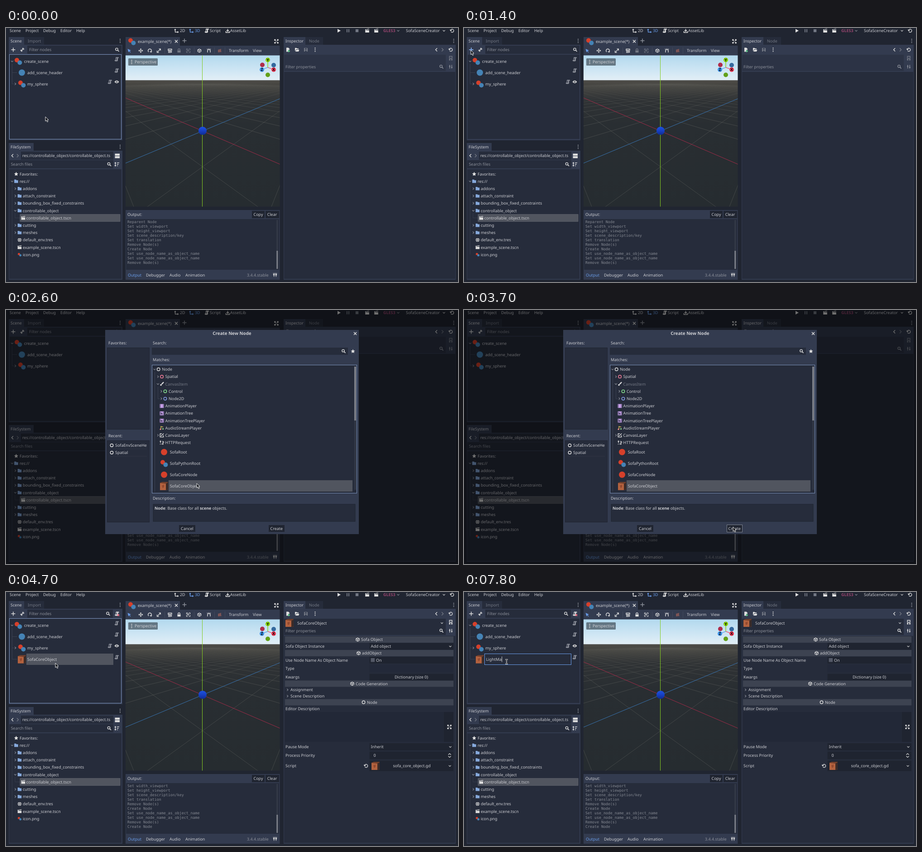
An HTML page that plays this animation: 998 px wide and 561 px high, repeating every 8000 ms.

```html
<!DOCTYPE html>
<html lang="en">
<head>
<meta charset="utf-8">
<title>Scene editor</title>
<style>
html, body { margin: 0; width: 100%; height: 100%; overflow: hidden; background: #202531; }
svg { display: block; width: 998px; height: 561px; }
text { font: 8.95px "Noto Sans", sans-serif; fill: #cdced3; white-space: pre; text-rendering: geometricPrecision; }
.b { font-weight: 700; }
.title { font-weight: 700; font-size: 9.8px; }
.mono { font: 8.29px "DejaVu Sans Mono", monospace; }
</style>
</head>
<body>
<svg id="stage" viewBox="0 0 998 561" xmlns="http://www.w3.org/2000/svg"></svg>
<script>
const BG = '#202531', PANEL = '#333b4f', WELL = '#262c3b', DARK = '#1f2430';
const TEXT = '#cdced3', ICON = '#e0e0e0', DIM = '#737884', GREY = '#8d919b', BLUE = '#699ce8';
const SELECT = '#51555f', FOCUS = '#7990b8', RED = '#d6402b', PINK = '#fc7f9c', PURPLE = '#cea4f1';

// Drawing helpers; y is the vertical middle of text and icons
const text = (x, y, s, fill = TEXT, extra = '') =>
  `<text x="${x}" y="${y + 3.2}" style="fill:${fill}" ${extra}>${s}</text>`;
const mid = (x, y, s, extra = '') => text(x, y, s, TEXT, 'text-anchor="middle" ' + extra);
const box = (x1, y1, x2, y2, fill, stroke = 'none', w = 1) =>
  `<rect x="${x1}" y="${y1}" width="${x2 - x1}" height="${y2 - y1}" fill="${fill}" stroke="${stroke}" stroke-width="${w}"/>`;
const frame = (x1, y1, x2, y2, stroke) => box(x1 + .5, y1 + .5, x2 - .5, y2 - .5, 'none', stroke);
const dot = (x, y, r, fill) => `<circle cx="${x}" cy="${y}" r="${r}" fill="${fill}"/>`;
const ring = (x, y, c = ICON) => `<circle cx="${x}" cy="${y}" r="3.2" fill="none" stroke="${c}" stroke-width="1.4"/>`;
const line = (x, y, d, c = ICON, w = 1.3) =>
  `<path transform="translate(${x} ${y})" d="${d}" fill="none" stroke="${c}" stroke-width="${w}"/>`;
const solid = (x, y, d, c = ICON) => `<path transform="translate(${x} ${y})" d="${d}" fill="${c}" fill-rule="evenodd"/>`;
const group = (id, body) => `<g id="${id}">${body}</g>`;
const rows = (list, fn) => list.map(fn).join('');

// Icons
const right = (x, y, c = GREY) => line(x, y, 'M-1.2-2.4L1.3 0L-1.2 2.4', c, 1.1);
const down = (x, y, c = GREY) => line(x, y, 'M-2.4-1.2L0 1.3L2.4-1.2', c, 1.1);
const back = (x, y) => line(x, y, 'M2-3.5L-1.5 0L2 3.5', ICON, 1.4);
const next = (x, y) => line(x, y, 'M-2-3.5L1.5 0L-2 3.5', DIM, 1.4);
const dots = (x, y, c = ICON) => dot(x, y - 3.6, 1.1, c) + dot(x, y, 1.1, c) + dot(x, y + 3.6, 1.1, c);
const lens = (x, y, c = ICON) => line(x, y, 'M1 1L4 4', c, 1.7) + `<circle cx="${x - 1}" cy="${y - 1}" r="2.7" fill="none" stroke="${c}" stroke-width="1.3"/>`;
const plus = (x, y, c = ICON) => line(x, y, 'M-4.5 0H4.5M0-4.5V4.5', c, 1.5);
const cross = (x, y, c = ICON) => line(x, y, 'M-3-3L3 3M3-3L-3 3', c, 1.5);
const folder = (x, y, c = '#86a9dc') => solid(x, y, 'M-4.3-3.7H-.5L.7-2.3H4.3V3.7H-4.3Z', c);
const scroll = (x, y, c = GREY) => solid(x, y, 'M-1.8-4.5H3.6Q4.8-4.5 4.8-2.5H2.5V2.4Q2.5 4.5 .5 4.5H-3Q-4.8 4.5-4.8 1.8H-2.6V-3Z M-1.4-2.8V2H0V-2.8Z', c);
const clapper = (x, y) => solid(x, y, 'M-4.3-1H4.3V4H-4.3ZM-4.5-3L3.8-4.5L4.2-2.5L-4.2-1.2ZM-2-3.4L-1-1.8L.2-2L-.8-3.6ZM1.2-4L2.2-2.3L3-2.5L2.4-4.2Z');
const star = (x, y) => solid(x, y, 'M0-4.5L1.4-1.5L4.5-1.2L2.2 1L2.9 4.2L0 2.6L-2.9 4.2L-2.2 1L-4.5-1.2L-1.4-1.5Z');
const cube = (x, y) => line(x, y, 'M0-3.8L3.6-2V2L0 3.8L-3.6 2V-2ZM-3.6-2L0-.2L3.6-2M0-.2V3.8', ICON, 1.2);
const expand = (x, y) => line(x, y, 'M-1-1L-4-4M1-1L4-4M-1 1L-4 4M1 1L4 4M-4-1.5V-4H-1.5M1.5-4H4V-1.5M-4 1.5V4H-1.5M1.5 4H4V1.5', ICON, 1.3);
const turn = (x, y, c = ICON) => line(x, y, 'M-3.2-1A3.5 3.5 0 1 1-2.6 2.2M-4.6-2.4L-3.2.2L-.7-1', c, 1.3);
const lock = (x, y, c) => solid(x, y, 'M-3.5-.5H3.5V4.2H-3.5Z', c) + line(x, y, 'M-2.2-.5V-2Q-2.2-4 0-4T2.2-2V-.5', c);
const node4 = (x, y, c) => line(x, y, 'M-4-1V-4H-1M1-4H4V-1M4 1V4H1M-1 4H-4V1M-2-2H1V1H-2Z', c, 1.1);
const eye = (x, y) => solid(x, y, 'M-5 0Q0-6.5 5 0Q0 6.5-5 0ZM-2 0A2 2 0 1 0 2 0A2 2 0 1 0-2 0Z') + dot(x, y, 1, ICON);
const tools = (x, y, c) => line(x, y, 'M-2.3-4V4M2.3-4V4M-3.8-1H-.8M.8 1.5H3.8', c, 1.3);
const docs = (x, y, c) => line(x, y, 'M-3-4.5H3V0H-3Z', c) + dot(x - 2.4, y + 3, 1.7, c) + dot(x + 2.4, y + 3, 1.7, c);
const film = (x, y) => solid(x, y, 'M-4.5-4.2H4.5V4.2H-4.5ZM-3.6-3.2V-1.7H-2.4V-3.2ZM-3.6-.8V.8H-2.4V-.8ZM-3.6 1.7V3.2H-2.4V1.7ZM2.4-3.2V-1.7H3.6V-3.2ZM2.4-.8V.8H3.6V-.8ZM2.4 1.7V3.2H3.6V1.7Z', PURPLE);
const snake = (x, y) => dot(x, y, 7, '#4583b5');
const mixed = (x, y, k = 1) => dot(x - 3 * k, y - 2.5 * k, 5 * k, RED) + dot(x + 3.4 * k, y + 3 * k, 5 * k, '#4583b5');
const crate = (x, y) => solid(x, y, 'M-9-7L-4-9H9V8L5 9H-9Z', '#74402c') +
  solid(x, y, 'M-9-6.5L4-5V9H-9Z', '#b3623f') + solid(x, y, 'M4-5L9-8V7.5L4 9Z', '#3d2c28') +
  solid(x, y, 'M-5-1L0-3V2L-3 5Z', '#93492f');

function menuBar() {
  const menus = [[8, 'Scene'], [43, 'Project'], [82, 'Debug'], [120, 'Editor'], [155, 'Help']];
  const arrows = 'M-3.5-3V3H3M-5-1.5L-3.5-3.5L-2-1.5M1.5 1.5L3.5 3L1.5 4.5';
  return rows(menus, ([x, s]) => text(x, 6, s)) +
    line(377, 6, arrows) + text(384, 6, '2D') + line(410, 6, arrows, BLUE) + text(417, 6, '3D', BLUE) +
    scroll(443.5, 6, ICON) + text(450, 6, 'Script') +
    line(489.5, 6, 'M0-4V1M-2.5-1L0 1.5L2.5-1M-4 1V4H4V1', ICON, 1.5) + text(495, 6, 'AssetLib') +
    solid(735, 6, 'M-3-4L4 0L-3 4Z') + solid(755, 6, 'M-3-3.5H-1V3.5H-3ZM1-3.5H3V3.5H1Z', DIM) +
    solid(775, 6, 'M-3.2-3.2H3.2V3.2H-3.2Z', DIM) + clapper(797.5, 6) + clapper(817.5, 6) +
    text(833, 6, 'GLES3', '#96456e', 'class="b"') + down(866, 6) +
    text(883, 6, 'SofaSceneCreator') + down(967, 6, ICON) + turn(985, 6);
}

function sceneDock() {
  return box(6, 20, 40, 38, PANEL) + box(40, 20, 84, 37, WELL) + text(10, 28.5, 'Scene') + text(48, 28.5, 'Import', DIM) +
    dots(252, 28.5, GREY) + box(6, 37, 257, 248, PANEL) + plus(16, 48) +
    line(36, 48, 'M-1.5 1.5L1.5-1.5M0-2L1.5-3.5L3.5-1.5L2 0M0 2L-1.5 3.5L-3.5 1.5L-2 0', ICON, 1.4) +
    group('filterWide', box(47, 39, 255, 57, WELL) + lens(245.5, 48)) +
    group('filterSlim', box(47, 39, 236, 57, WELL) + lens(225.5, 48) + scroll(245, 48, ICON) + line(248, 51, 'M-2-2L2 2M2-2L-2 2', '#ff7085', 1.5)) +
    text(51, 48, 'Filter nodes', GREY) + box(8, 59, 255, 245, WELL) +
    line(13.5, 79, 'M0 0V44M0 19.5H11M0 44.5H4', '#3a4050', 1) +
    down(13.5, 73.5) + mixed(27, 73.5) + text(40, 73.5, 'create_scene') + scroll(244.5, 69) +
    snake(35, 98.5) + text(47, 98.5, 'add_scene_header') + scroll(244.5, 94) +
    right(20.5, 123.5) + mixed(35, 123.5) + text(47, 123.5, 'my_sphere') + scroll(229.5, 119) + eye(244.5, 119);
}

function fileDock() {
  const names = ['addons', 'attach_constraint', 'bounding_box_fixed_constraints', 'controllable_object',
    'controllable_object.tscn', 'cutting', 'meshes', 'default_env.tres', 'example_scene.tscn', 'icon.png'];
  const y = i => 322.3 + 16.2 * i;
  return box(6, 254, 61, 272, PANEL) + text(10, 263, 'FileSystem') + dots(252, 262.5, GREY) +
    box(6, 271, 257, 556, PANEL) + back(14, 282) + next(26, 282) + box(33, 273, 237, 291, WELL) +
    text(36, 282, 'res://controllable_object/controllable_object.ts') +
    box(240.5, 277.5, 251, 282, ICON) + box(240.5, 283, 251, 287.5, ICON) +
    box(7, 292, 237, 310, WELL) + text(10.7, 301, 'Search files', GREY) + lens(228, 301) +
    line(245, 301, 'M-3.5-4V4M-5-2.3L-3.5-4L-2-2.3M-5 2.3L-3.5 4L-2 2.3M0-3.3H5M0 0H3.5M0 3.3H2') +
    box(7, 312, 255, 554, WELL) + line(13.5, 344, 'M0 0V156M6.5 65V75.5H18', '#343a4a', 1) +
    star(22.5, y(0)) + text(30, y(0), 'Favorites:') + down(13.5, y(1)) + folder(22.5, y(1)) + text(30, y(1), 'res://') +
    box(31, 411.7, 252, 427.3, SELECT, '#666a74', .7) +
    rows(names, (s, i) => {
      const row = y(i + 2);
      const icon = i == 4 ? clapper(38, row) : i == 7 ? dot(30, row, 4.2, ICON) + line(30, row, 'M-4 0H4M0-4Q-4 0 0 4M0-4Q4 0 0 4', WELL, .8)
        : i == 8 ? clapper(30, row) : i == 9 ? mixed(30, row, .5)
        : (i == 3 ? down(20.5, row) : right(20.5, row)) + folder(30, row);
      return icon + text(i == 4 ? 44.7 : 37, row, s);
    });
}

// Ground grid seen from a camera pitched 25 degrees, turned 45 degrees
function grid() {
  const D = 3.08, F = 237.8, sin = Math.sin(.4363), cos = Math.cos(.4363), far = 60;
  const point = (x, z) => {
    const w = (x + z) / Math.SQRT2, depth = D - w * cos;
    return [434 + F * (x - z) / Math.SQRT2 / depth, 227.5 + F * w * sin / depth].map(v => v.toFixed(1)).join(' ');
  };
  let d = '';
  for (let n = -40; n <= 40; n++) {
    const end = Math.min(far, (D - .1) / cos * Math.SQRT2 - n);
    if (n && end > -far) d += `M${point(n, -far)}L${point(n, end)}M${point(-far, n)}L${point(end, n)}`;
  }
  return `<path d="${d}" stroke="url(#gridInk)" stroke-width=".8" fill="none"/>`;
}

function viewport() {
  const gizmo = (x, y, c, s = '') => dot(x, y, 5, c) + (s && text(x, y, s, '#111', 'class="b" text-anchor="middle"'));
  return box(264, 20, 384, 40, PANEL) + mixed(278, 30) + text(291, 29.5, 'example_scene(*)') + cross(376, 29.5) +
    plus(394, 28, GREY) + expand(597, 29.5) + box(263.9, 39, 604.5, 61, PANEL) +
    solid(272, 50, 'M-3.5-4L4-.5L.7.7L3.5 3.5L2.5 4.3L-.4 1.5L-1.5 4.3Z', BLUE) +
    line(297.5, 50, 'M0-4V4M-4 0H4M-1.5-2.7L0-4.3L1.5-2.7M-1.5 2.7L0 4.3L1.5 2.7M-2.7-1.5L-4.3 0L-2.7 1.5M2.7-1.5L4.3 0L2.7 1.5', ICON, 1.1) +
    line(317.5, 50, 'M-2.5 3A3.8 3.8 0 1 1 2.5 3M.5 1.5L2.5 3.3L4.5 2', ICON, 1.5) +
    line(337.5, 50, 'M-2.5 2.5L3.5-3.5M0-3.8H3.8V0M-4 0V4H0', ICON, 1.3) +
    line(362, 50, 'M-4-3.5H4V-.5H-4ZM-4 1.5H1M-4 4H1') + solid(362, 50, 'M1.5 0L5 3L1.5 5Z') +
    group('lockOff', lock(382, 50, DIM) + node4(402.5, 50, DIM)) + group('lockOn', lock(382, 50, ICON) + node4(402.5, 50, ICON)) +
    cube(427, 50) + line(448, 50, 'M-3 4V0Q-3-2.5 0-2.5T3 0V4M-4-4L-3-3M4-4L3-3M0-5V-3.8', ICON, 1.4) +
    solid(472, 50, 'M-4-2L3-4V1L4 3L-4 4Z', '#7c5455') +
    rows([350, 415, 460, 483], x => box(x, 43, x + .7, 57, '#4a5162')) +
    text(492, 50, 'Transform') + text(545, 50, 'View') +
    `<g clip-path="url(#viewClip)">` + box(263, 60, 606, 115.6, 'url(#sky)') + box(263, 115.6, 606, 396, 'url(#ground)') + grid() +
    line(264, 154.4, 'M0 0L341 146.6', '#b02a4b', .9) + line(264, 298.5, 'M0 0L341-142.5', '#3a7cc0', .9) +
    line(433.5, 60, 'M0 0V335', '#84cc22', 1) + dot(434, 227, 9.1, 'url(#ball)') + '</g>' +
    `<rect x="270" y="67" width="65" height="16" rx="1.5" fill="#28323c" fill-opacity=".6"/>` + dots(277.5, 75) + text(284, 75, 'Perspective') +
    gizmo(566, 81.5, '#b02c4b') + gizmo(591, 82, '#34699e') + gizmo(578, 103.5, '#62a019') +
    line(578, 87, 'M0 0V-16', '#87d602', 1.3) + line(578, 87, 'M0 0L-13 5', '#3d95ee', 1.3) + line(578, 87, 'M0 0L13 5', '#f33352', 1.3) +
    gizmo(578, 70.5, '#87d602', 'Y') + gizmo(565, 92, '#3d95ee', 'Z') + gizmo(591, 92, '#f33352', 'X');
}

function output() {
  const log = ['Reparent Node', 'Set width_viewport', 'Set height_viewport', 'Set scene_description/key', 'Set translation',
    'Remove Node(s)', 'Create Node', 'Set use_node_name_as_object_name', 'Set use_node_name_as_object_name', 'Remove Node(s)', 'Create Node'];
  return box(263.9, 402, 604.5, 556, PANEL) + text(268, 412, 'Output:') +
    box(543, 404, 571, 420, BG) + mid(557, 412, 'Copy') + box(573, 404, 603, 420, BG) + mid(587.5, 412, 'Clear') +
    box(265, 422, 603, 534, WELL) + `<g clip-path="url(#logClip)">` +
    group('log', rows(log, (s, i) => text(268, 427.4 + 10 * i, s, '#858992', 'class="mono"'))) + '</g>' +
    box(597.5, 424, 600, 532, '#353b49') + box(597.3, 492, 600.3, 532, '#7d818a') +
    text(269, 545.5, 'Output', BLUE) + text(309, 545.5, 'Debugger') + text(361, 545.5, 'Audio') + text(396, 545.5, 'Animation') +
    text(532, 545.5, '3.4.4.stable', GREY) + line(594, 545.5, 'M-4.5-3.5H4.5M-2.3 4V-1.5M2.3 4V-1.5M-4.2 0L-2.3-2L-.6 0M.6 0L2.3-2L4.2 0', ICON, 1.2);
}

function inspector() {
  const header = (y, x, s, icon) => box(616, y - 7, 988, y + 7, '#3d4351') + icon(x - 7.5, y) + text(x, y, s);
  const field = (y, h = 7.5) => box(802.5, y - h, 988, y + h, DARK);
  const labels = [[120, 'Sofa Object Instance'], [150.5, 'Use Node Name As Object Name'], [169, 'Type'], [188, 'Kwargs'],
    [257.5, 'Editor Description'], [342, 'Pause Mode'], [361, 'Process Priority'], [384, 'Script']];
  return box(613, 20, 661, 38, PANEL) + box(661, 20, 700, 37, WELL) + text(617, 28.5, 'Inspector') + text(669, 28.5, 'Node', DIM) +
    dots(988.5, 28.5, GREY) + box(613, 37, 993, 556, PANEL) +
    solid(622.5, 48, 'M-3.5-4.5H1L3.5-2V0H1V4.5H-3.5Z') + line(624.5, 51, 'M-2.5 0H2.5M0-2.5V2.5', '#5fd38d', 1.5) +
    solid(642.5, 48, 'M-4.5-4H-1L0-2.7H3.5V-1H-2L-3.5 2.5H-4.5ZM-1.5 0H5L3.5 4H-3.5Z') +
    solid(662, 48, 'M-4-4H3L4-3V4H-4ZM-2-3V-.5H2V-3ZM-1.5 1.5V4H1.5V1.5Z', DIM) + dots(682.5, 48) + back(950, 48) + next(964, 48) + turn(982, 48) +
    box(614, 97, 992, 554, WELL) +
    group('idle', box(614, 59, 971, 77, '#2c3345') + box(614, 77, 971, 95, '#2c3345') + text(617, 85.5, 'Filter properties', GREY) +
      lens(961.5, 85.5, GREY) + docs(982, 67, DIM) + tools(982, 85.5, GREY)) +
    group('props', box(614, 59, 971, 77, WELL) + crate(626, 68.5) + text(643, 68.5, 'SofaCoreObject') + down(962.5, 68.5, ICON) +
      box(614, 77, 971, 95, WELL) + text(617, 85.5, 'Filter properties', GREY) + lens(961.5, 85.5) +
      docs(982, 67, ICON) + tools(982, 85.5, ICON) +
      header(105, 784, 'Sofa Object', cube) + header(135, 786, 'addObject', cube) +
      header(202.5, 772, 'Code Generation', cube) + header(243.5, 797, 'Node', ring) +
      field(120) + text(805.5, 120, 'Add object') + down(981, 120, ICON) +
      field(150.5) + box(805.5, 146, 814, 154.5, '#545967') + text(817, 150.5, 'On') +
      box(802.5, 160, 988, 178, '#232939') + field(188) + mid(895, 188, 'Dictionary (size 0)') +
      right(621.5, 216) + text(628, 216, 'Assignment') + right(621.5, 230) + text(628, 230, 'Scene Description') +
      box(616, 265, 967, 331, '#222837') + box(967, 265, 988, 331, DARK) + expand(979, 298) +
      field(342, 8) + text(805.5, 342, 'Inherit') + down(981, 342, ICON) +
      field(361, 8.5) + text(811.5, 361, '0') + line(979.5, 361, 'M-3-1.5L0-4.2L3-1.5M-3 1.5L0 4.2L3 1.5', ICON, 1.2) +
      field(384, 11.5) + turn(795, 384) + crate(816, 384) + mid(896, 384, 'sofa_core_object.gd') + down(980, 384, ICON) +
      rows(labels, ([y, s]) => text(617, y, s)));
}

function dialog() {
  const brush = (x, y) => line(x, y, 'M-.5.5L4-4', ICON, 2.2) + dot(x - 2, y + 2.2, 1.8, ICON);
  const tree = (x, y) => film(x, y) + line(x, y, 'M-1.5-2V2H1.5M-1.5 0H1.5', WELL, 1);
  const audio = (x, y) => line(x, y, 'M-2 2.5V-3.5L3-2', '#e0c75a', 1.3) + dot(x - 3, y + 2.8, 1.7, '#e58a8a') + dot(x + 2.5, y + 2, 1.7, '#8fd48f');
  const layer = (x, y) => line(x, y, 'M3.5 0V3.8H-3.8V-3.5H0M-2 2L4-4', ICON, 1.4);
  const http = (x, y) => line(x, y, 'M-3-4V1M-1.2 2.5V4M2-4V4M-4.5-2.5L-3-4L-1.5-2.5M.5 2.5L2 4L3.5 2.5M-4.5 3.5H-3M4 1V-3', ICON, 1.2);
  const types = [['Node', 0, down, ring], ['Spatial', 1, right, (x, y) => ring(x, y, PINK)], ['CanvasItem', 1, down, brush],
    ['Control', 2, right, (x, y) => ring(x, y, '#8eef97')], ['Node2D', 2, right, (x, y) => ring(x, y, '#8da5f3')],
    ['AnimationPlayer', 1, 0, film], ['AnimationTree', 1, 0, tree], ['AnimationTreePlayer', 1, 0, tree],
    ['AudioStreamPlayer', 1, 0, audio], ['CanvasLayer', 1, right, layer], ['HTTPRequest', 1, 0, http]];
  const big = ['SofaRoot', 'SofaPythonRoot', 'SofaCoreNode', 'SofaCoreObject'];
  const red = (x, y) => dot(x, y, 7, RED);
  return box(0, 0, 998, 561, 'rgba(0,0,0,.5)') + box(219, 44, 779, 495, PANEL) +
    mid(499, 52, 'Create New Node', 'class="title"') + cross(771, 52) +
    text(226, 72.5, 'Favorites:') + text(324, 72.5, 'Search:') + text(324, 110, 'Matches:') + text(226, 277.5, 'Recent:') + text(324, 415.5, 'Description:') +
    box(223.5, 83.5, 316.5, 263.5, WELL, DARK) + box(223.5, 288.5, 316.5, 468.5, WELL, DARK) +
    ring(233.5, 299) + text(241, 299, 'SofaEnvSceneHe') + ring(233.5, 315) + text(241, 315, 'Spatial') +
    box(229, 306.5, 311, 307.2, '#353b4a') + box(229, 322.6, 311, 323.3, '#353b4a') +
    box(322, 83, 755, 99, WELL) + lens(745.5, 91) + star(766, 91) + box(322, 121, 775, 405, WELL) +
    group('pickNode', box(342, 123, 765, 139, SELECT) + frame(322, 82, 755, 99, BLUE) + box(325.5, 85.5, 326.5, 96.5, ICON)) +
    group('pickObject', box(359, 376, 765, 401, SELECT) + frame(322, 121, 775, 405, FOCUS)) +
    line(328.5, 137, 'M0 0V264M7 33V59H11', '#3a4050', 1) +
    rows(types, ([s, depth, arrow, icon], i) => {
      const x = 328 + 7.4 * depth, y = 131 + 16.2 * i;
      return (arrow ? arrow(x, y) : '') + icon(x + 8.7, y) + text(x + 16.2, y, s, s == 'CanvasItem' ? DIM : TEXT);
    }) +
    rows(big, (s, i) => [red, mixed, red, crate][i](349, 313.7 + 25 * i) + text(361.7, 313.7 + 25 * i, s)) +
    box(769.5, 125, 772.5, 397, '#353b49') + box(769, 125, 773, 244, '#7d818a') +
    box(325, 429, 771, 467, WELL, DARK) +
    text(328, 438, '<tspan class="b">Node</tspan>: Base class for all <tspan class="b">scene</tspan> objects.') +
    box(382, 475, 418, 490, BG) + mid(400, 482.5, 'Cancel') + box(580, 475, 615, 490, BG) +
    group('hoverCreate', frame(580, 474, 615, 491, '#7c828e')) + mid(597.3, 482.5, 'Create');
}

const fade = (id, y1, y2, stops) => `<linearGradient id="${id}" gradientUnits="userSpaceOnUse" x1="0" x2="0" y1="${y1}" y2="${y2}">` +
  rows(stops, ([o, c, a = 1]) => `<stop offset="${o}" stop-color="${c}" stop-opacity="${a}"/>`) + '</linearGradient>';
const clip = (id, ...b) => `<clipPath id="${id}">${box(...b, '#000')}</clipPath>`;

const stage = document.getElementById('stage');
stage.innerHTML = '<defs>' +
  fade('sky', 61, 115.6, [[0, '#b3d9ee'], [.6, '#cfe6f4'], [1, '#e3eff6']]) +
  fade('ground', 115.6, 395, [[0, '#504e49'], [.05, '#3d3d3a'], [.14, '#303335'], [.35, '#292e32'], [1, '#262c30']]) +
  fade('gridInk', 118, 210, [[0, '#85857d', 0], [.25, '#85857d', .15], [1, '#85857d', .36]]) +
  fade('ball', 217, 237, [[0, '#1f55e2'], [.5, '#1740c4'], [1, '#0e2a8c']]) +
  clip('viewClip', 263.9, 60.5, 604.5, 394.5) + clip('logClip', 265, 423, 597, 533) + '</defs>' +
  box(0, 0, 998, 561, BG) + menuBar() + sceneDock() + fileDock() + viewport() + output() + inspector() +
  group('hotPlus', plus(16, 48, BLUE)) +
  group('added', line(13.5, 123, 'M0 0V25.5H11', '#3a4050', 1) + box(45, 136, 237, 161, SELECT) + text(47, 148.5, 'SofaCoreObject') + crate(35, 148.5) + scroll(244.5, 144)) +
  group('rename', box(45.5, 136.5, 236.5, 160.5, WELL, BLUE) + group('picked', box(48.5, 142, 114.3, 155, '#415a85')) +
    text(48.7, 148.5, '', TEXT, 'id="entry"') + box(0, 142.5, .9, 154.5, ICON).replace('<rect', '<rect id="caret"')) +
  group('treeFocus', frame(7, 58, 255, 246, FOCUS)) + group('dialog', dialog()) +
  group('arrow', '<path d="M0 0V9.8L2.3 7.8L4 11.6L5.8 10.8L4.2 7.1L7 6.8Z" fill="#15171c" stroke="#fff" stroke-width=".9" stroke-linejoin="round"/>') +
  group('beam', line(0, 0, 'M-2.6-4.8H2.6M0-4.8V4.8M-2.6 4.8H2.6', '#fff', 2.2) + line(0, 0, 'M-2.3-4.8H2.3M0-4.8V4.8M-2.3 4.8H2.3', '#15171c', 1));

const $ = id => document.getElementById(id);
const show = (id, on) => { $(id).style.display = on ? '' : 'none'; };

// Pointer moves: start time, number of 100 ms steps, end point
const MOVES = [[100, 4, 28, 97], [600, 2, 12, 72], [900, 4, 15, 49], [1700, 9, 421, 383], [2800, 7, 590, 472],
  [3500, 2, 594, 479], [3900, 9, 109, 157], [5200, 2, 94, 154]];
const KEYS = [5700, 5900, 6100, 6600, 7000, 7500, 7800];

function pointer(t) {
  let x = 87, y = 196;
  for (const [start, steps, tx, ty] of MOVES) {
    if (t < start) break;
    const k = Math.min(1, (Math.floor((t - start) / 100) + 1) / steps), e = k * k * (3 - 2 * k);
    x += (tx - x) * e;
    y += (ty - y) * e;
  }
  return `translate(${x.toFixed(1)} ${y.toFixed(1)})`;
}

function render(t) {
  const added = t >= 3800, rename = t >= 4900, typed = KEYS.filter(k => t >= k).length;
  show('treeFocus', t < 1400 || t >= 4700 && !rename);
  show('hotPlus', t >= 1100 && t < 1500);
  show('dialog', t >= 1500 && !added);
  show('pickNode', t < 2600);
  show('pickObject', t >= 2600);
  show('hoverCreate', t >= 3500);
  for (const id of ['added', 'props', 'filterSlim', 'lockOn']) show(id, added);
  for (const id of ['idle', 'filterWide', 'lockOff']) show(id, !added);
  $('log').setAttribute('transform', `translate(0 ${added ? -10 : 0})`);
  $('log').lastElementChild.style.display = added ? '' : 'none';
  show('rename', rename);
  show('picked', !typed);
  if (rename) {
    $('entry').textContent = typed ? 'LightMa'.slice(0, typed) : 'SofaCoreObject';
    $('caret').setAttribute('x', 48.9 + $('entry').getComputedTextLength());
  }
  show('arrow', !rename);
  show('beam', rename);
  $(rename ? 'beam' : 'arrow').setAttribute('transform', pointer(t));
}

function tick() {
  render(performance.now() % 8000);
  requestAnimationFrame(tick);
}
tick();
</script>
</body>
</html>
```
